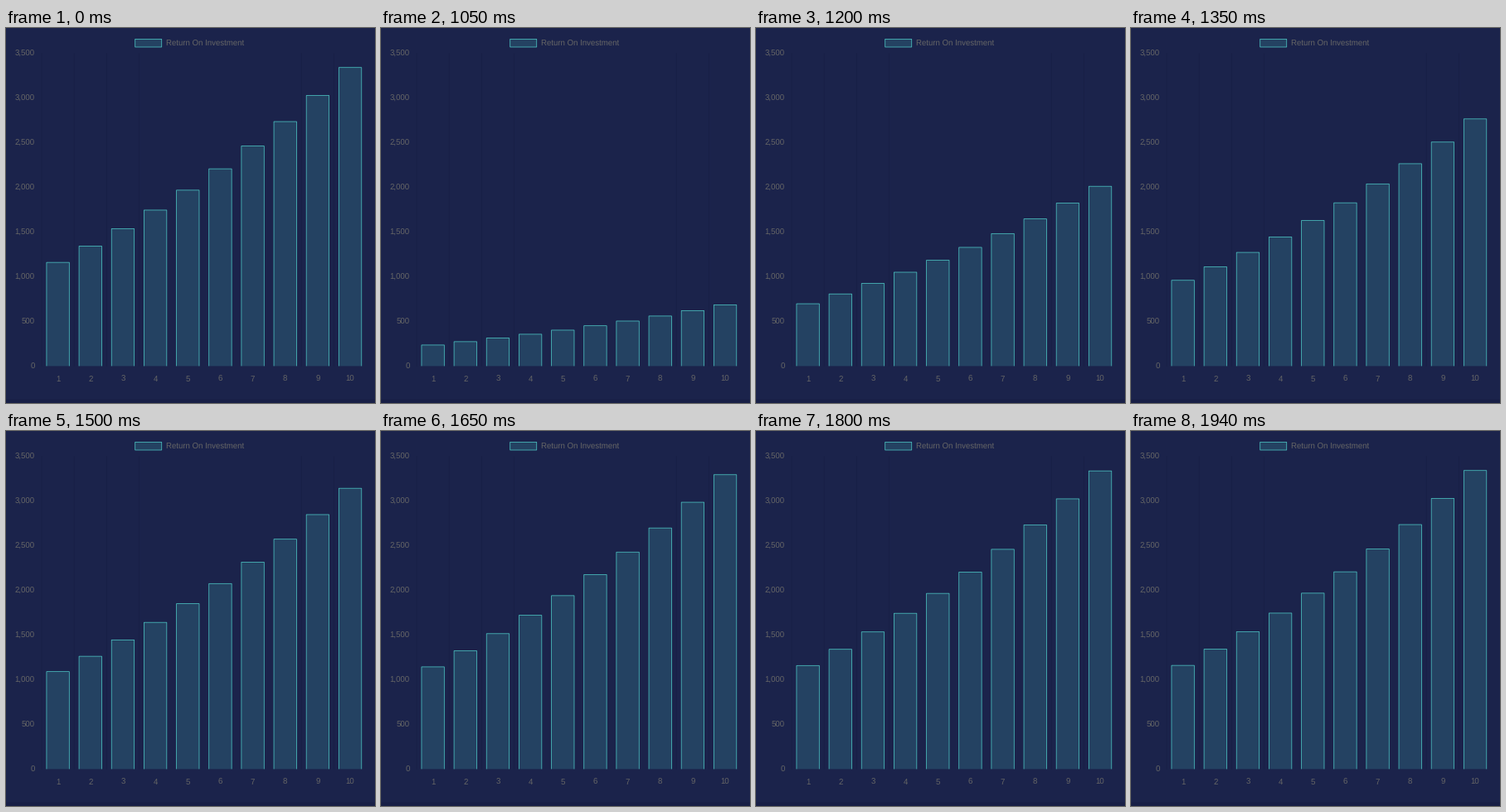
A matplotlib script that plays this animation: 445 px wide and 453 px high, repeating every 4190 ms.

```python
import matplotlib.pyplot as plt
from matplotlib.animation import FuncAnimation
from matplotlib.patches import Polygon, Rectangle

W, H, DPI = 445, 453, 64          # 64 keeps the pixel size exact
PT = 72 / DPI                     # one pixel in points
LOOP, TICK = 4190, 10             # ms

NAVY, STRIP, GRID, GREY = "#1b234b", "#181f46", "#181f45", "#666666"
TEAL = (75 / 255, 192 / 255, 192 / 255)
LINE = 0.8

LEFT, SLOT = 43.05, 39.16         # plot edge and category width
TOP, BASE, Y_MAX = 30.6, 408.4, 3500
BAR = SLOT * 0.72

START, STEP, END = 1050, 150, 1940   # ms, the bars regrow in held steps

plt.rcParams.update({
    "font.family": "Liberation Sans",
    "font.size": 9.6 * PT,
    "text.color": GREY,
    "text.hinting": "none",
    "path.snap": False,
    "toolbar": "None",
})

# yearly balance: 7 % growth plus a fixed deposit
values = [1164 + 182.1 * (1.07 ** n - 1) / 0.07 for n in range(10)]

fig = plt.figure(figsize=(W / DPI, H / DPI), dpi=DPI, facecolor=NAVY)
ax = fig.add_axes([0, 0, 1, 1])
ax.set(xlim=(0, W), ylim=(H, 0))
ax.axis("off")


def label(x, mid, text, ha):
    ax.text(x, mid + 3.5, text, ha=ha, va="baseline")


def teal_style():
    return dict(facecolor=TEAL + (0.2,), edgecolor=TEAL,
                linewidth=LINE * PT, joinstyle="miter", capstyle="butt")


def draw_backdrop():
    ax.add_patch(Rectangle((0, 448.5), W, 5, color=STRIP, lw=0))
    for i in (0, 1, 2, 3, 8, 9):
        x = LEFT + i * SLOT
        ax.plot([x, x], [TOP, BASE], color=GRID, lw=LINE * PT)
    for v in range(0, Y_MAX + 1, 500):
        label(34.6, BASE - v * (BASE - TOP) / Y_MAX, f"{v:,}", "right")
    for i in range(10):
        label(LEFT + (i + 0.5) * SLOT, 423.3, str(i + 1), "center")
    ax.add_patch(Rectangle((155.7, 13.4), 32, 9.6, **teal_style()))
    label(192.6, 18.2, "Return On Investment", "left")


def outline(i, grow):
    x0 = LEFT + (i + 0.5) * SLOT - BAR / 2 + LINE / 2
    x1 = x0 + BAR - LINE
    y = BASE - grow * values[i] * (BASE - TOP) / Y_MAX + LINE / 2
    return [(x0, BASE), (x0, y), (x1, y), (x1, BASE)]


def growth(ms):
    if not START <= ms < END:
        return 1
    t = 0.056 + (ms - START) // STEP * STEP / 1000
    return 1 - (1 - t) ** 4       # ease-out quart


draw_backdrop()
bars = [ax.add_patch(Polygon(outline(i, 1), closed=False, **teal_style()))
        for i in range(10)]


def update(frame):
    grow = growth(frame * TICK)
    for i, bar in enumerate(bars):
        bar.set_xy(outline(i, grow))
    return bars


anim = FuncAnimation(fig, update, frames=LOOP // TICK, interval=TICK,
                     repeat=True, repeat_delay=0, blit=False)
plt.show()
```
